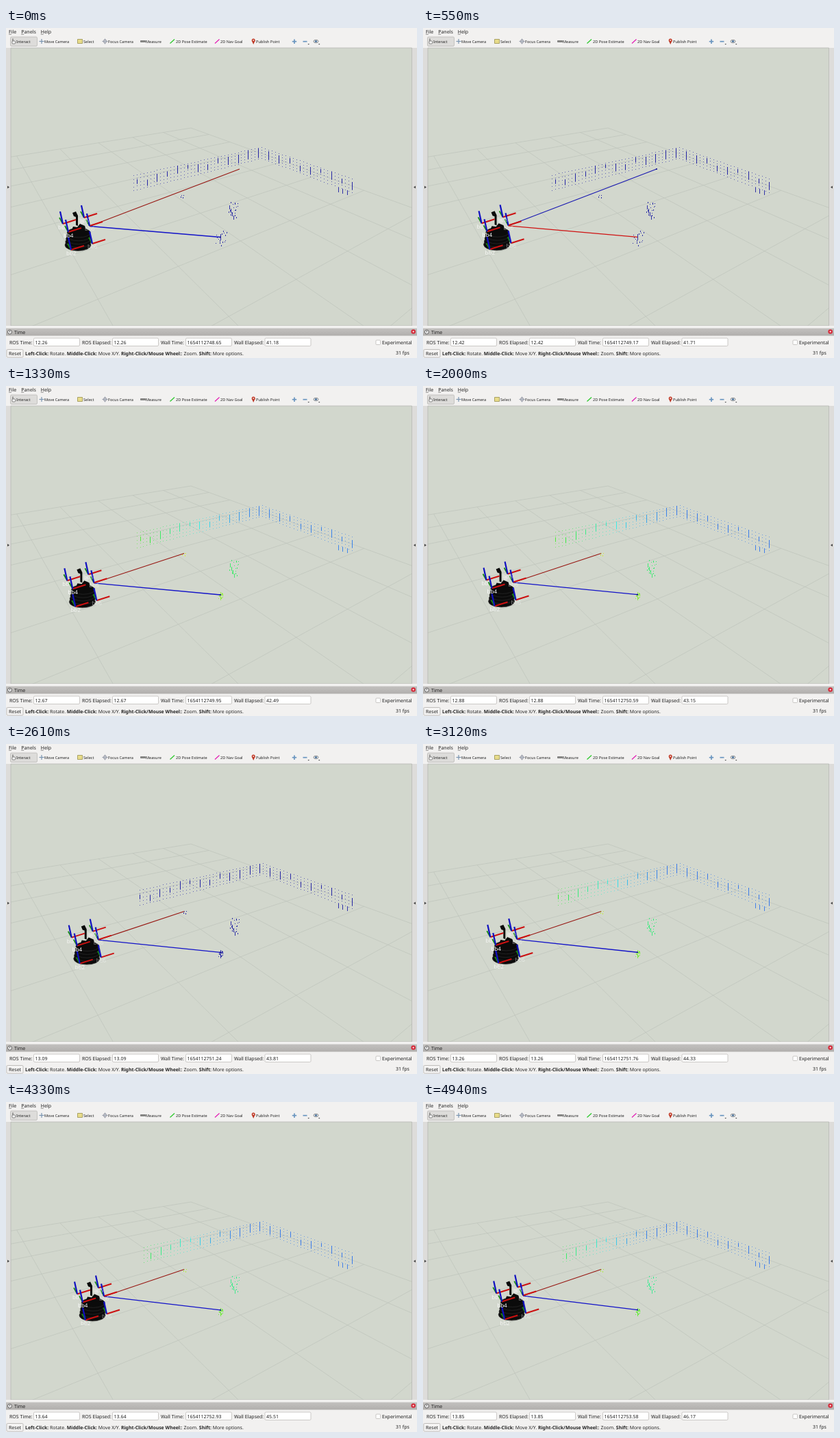
These frames come from a looping animation (600 px wide and 482 px high, 5 s). An HTML page with a canvas:

```html
<!DOCTYPE html>
<html lang="en">
<head>
<meta charset="utf-8">
<title>Laser scan view</title>
<style>
html, body { margin: 0; width: 600px; height: 482px; overflow: hidden; background: #f2f1f0; }
canvas { display: block; }
</style>
</head>
<body>
<canvas id="stage" width="600" height="482"></canvas>
<script>
const ctx = document.getElementById('stage').getContext('2d');
const LOOP = 5000;
const UPDATE = 65;
const FONT = '"Noto Sans", sans-serif';
const INK = '#222';

const lerp = (a, b, p) => a + (b - a) * p;

function random(seed) {
  const v = Math.sin(seed * 127.1 + 11.7) * 43758.5453;
  return v - Math.floor(v);
}

function box(x, y, w, h, fill, stroke, r = 0) {
  ctx.beginPath();
  ctx.roundRect(x, y, w, h, r);
  if (fill) { ctx.fillStyle = fill; ctx.fill(); }
  if (stroke) { ctx.strokeStyle = stroke; ctx.lineWidth = 0.7; ctx.stroke(); }
}

function line(color, width, x1, y1, x2, y2) {
  ctx.beginPath();
  ctx.moveTo(x1, y1);
  ctx.lineTo(x2, y2);
  ctx.strokeStyle = color;
  ctx.lineWidth = width;
  ctx.stroke();
}

function shape(color, ...p) {
  ctx.beginPath();
  for (let i = 0; i < p.length; i += 2) ctx.lineTo(p[i], p[i + 1]);
  ctx.fillStyle = color;
  ctx.fill();
}

function oval(x, y, rx, ry, fill, stroke) {
  ctx.beginPath();
  ctx.ellipse(x, y, rx, ry, 0, 0, Math.PI * 2);
  if (fill) { ctx.fillStyle = fill; ctx.fill(); }
  if (stroke) { ctx.strokeStyle = stroke; ctx.lineWidth = 0.7; ctx.stroke(); }
}

// Returns the x where the text ends.
function text(str, x, y, size = 7, color = INK, weight = 400) {
  ctx.font = `${weight} ${size}px ${FONT}`;
  ctx.textRendering = 'geometricPrecision';
  ctx.fillStyle = color;
  ctx.fillText(str, x, y);
  return x + ctx.measureText(str).width;
}

function drawMenu() {
  let x = 4;
  for (const label of ['File', 'Panels', 'Help']) {
    line(INK, 0.5, x, 9.2, x + 4, 9.2);
    x = text(label, x, 8) + 7;
  }
}

function cross(color, width, x, y, r) {
  line(color, width, x - r, y, x + r, y);
  line(color, width, x, y - r, x, y + r);
}

function drawToolbar() {
  box(0, 11, 600, 18, '#f2f1f0');
  box(6.5, 13, 39, 13.5, '#dddcda', '#b5b3b0', 1.5);
  const labels = { 'Interact': 15, 'Move Camera': 56, 'Select': 113, 'Focus Camera': 149,
    'Measure': 204, '2D Pose Estimate': 248, '2D Nav Goal': 313, 'Publish Point': 365 };
  for (const label in labels) text(label, labels[label], 22, 5.6);

  box(9, 19, 4.5, 4, '#fff', '#555', 1);
  line('#555', 1, 10, 15.5, 10, 19);
  cross('#7a94b0', 1.2, 52, 19.5, 3.5);
  box(104.5, 16.5, 7, 6, '#e8dc8a', '#8b8440');
  cross('#8794a4', 0.8, 144.5, 19.5, 4);
  oval(144.5, 19.5, 2.5, 2.5, null, '#778');
  box(196.5, 18.5, 7, 2, '#8b8b86', '#666');
  line('#2cc92c', 1.3, 239.5, 22.5, 246, 16.5);
  line('#e321b5', 1.3, 305, 22.5, 311.5, 16.5);
  shape('#b93322', 358.8, 18.5, 361.2, 24, 363.6, 18.5);
  oval(361.2, 18, 2.5, 2.5, '#c33b28');
  oval(361.2, 18, 0.9, 0.9, '#eee');
  cross('#6a96c0', 1.7, 421, 19.7, 3.2);
  line('#6a96c0', 1.7, 433.5, 19.7, 439.5, 19.7);
  oval(452.5, 19.5, 3.5, 2.2, '#dfe8ef', '#666');
  oval(452.5, 19.5, 1.3, 1.3, '#234f80');
  for (const x of [440.5, 456]) shape('#444', x, 23, x + 2.5, 23, x + 1.2, 24.5);
}

function drawTimePanel(s) {
  box(0, 435, 600, 47, '#f2f1f0');
  const shade = ctx.createLinearGradient(0, 438, 0, 450);
  shade.addColorStop(0, '#c4c2c0');
  shade.addColorStop(1, '#b0aeac');
  box(0, 438.5, 600, 11, shade);
  oval(5.5, 444, 3, 3, '#eee', '#333');
  line('#333', 0.7, 5.5, 442, 5.5, 444.5);
  text('Time', 12, 446.7);
  oval(594.7, 443.5, 3.3, 3.3, '#d52b3b');
  oval(594.7, 443.5, 1.1, 1.1, '#fff');

  const ros = (12.256 + 0.322 * s).toFixed(2);
  const fields = [
    ['ROS Time:', 5, 40.5, ros],
    ['ROS Elapsed:', 111, 155.5, ros],
    ['Wall Time:', 226, 262.5, '16541127' + (48.65 + 0.997 * s).toFixed(2)],
    ['Wall Elapsed:', 333, 378, (41.18 + 1.01 * s).toFixed(2)]
  ];
  for (const [label, x, boxX, value] of fields) {
    text(label, x, 461.5);
    box(boxX, 453, 67, 11.5, '#fff', '#b8b5b2', 1.5);
    text(value, boxX + 2, 461.5);
  }
  box(540, 456, 6.5, 6.5, '#fff', '#b5b2af', 1);
  text('Experimental', 549, 461.5);

  box(1, 469.5, 24, 11.5, '#f5f4f3', '#aaa7a4', 1.5);
  text('Reset', 4, 478);
  const hints = ['Left-Click:', ' Rotate. ', 'Middle-Click:', ' Move X/Y. ',
    'Right-Click/Mouse Wheel:', ': Zoom. ', 'Shift:', ' More options.'];
  let x = 28;
  hints.forEach((hint, i) => { x = text(hint, x, 477.5, 6.9, INK, i % 2 ? 400 : 700); });
  text('31 fps', 569, 476.5);
}

// Perspective floor: a and b run from the far corner away from two vanishing points.
function floor(a, b) {
  const w = 1 - a - b;
  return [(270 - a * 1054 + b * 79) / w, (146 - (a + b) * 20) / w];
}

function drawGrid() {
  const stepA = 0.049, stepB = 0.07, nearest = 0.93;
  for (let k = 0; k <= 10; k++) {
    const a = k * stepA, b = k * stepB;
    line('#bec3ba', 0.7, ...floor(a, 0), ...floor(a, Math.min(10 * stepB, nearest - a)));
    line('#bec3ba', 0.7, ...floor(0, b), ...floor(Math.min(10 * stepA, nearest - b), b));
  }
}

// Either one dark blue, or a rainbow from green (near) to blue (far).
function scanColor(s) {
  const plain = s < 3 && s % 2 < 1;
  return hue => plain ? '#1414a0' : `hsl(${Math.min(218, hue + 4 * s)},85%,55%)`;
}

const wallHue = x => x < 300
  ? lerp(110, 185, (x - 200) / 100)
  : Math.min(210, lerp(185, 210, (x - 300) / 60));

function dot(x, y, color, h = 1) {
  ctx.fillStyle = color;
  ctx.fillRect(Math.round(x), Math.round(y), 1, h);
}

function drawWall(endX, endY, endHeight, startX, step, color, seed) {
  const rows = 5;
  const top = x => lerp(174, endY, (x - 373) / (endX - 373));
  const height = x => lerp(16, endHeight, (x - 373) / (endX - 373));
  const columns = Math.floor(Math.abs(endX - startX) / step);
  for (let c = 0; c <= columns; c++) {
    const x = lerp(startX, endX, c / columns);
    ctx.globalAlpha = 0.6;
    for (let r = 0; r < rows; r++) dot(x, top(x) + height(x) * r / (rows - 1), color(wallHue(x)));
    // Every third column holds a run of hits.
    if (c % 3 !== 1) continue;
    ctx.globalAlpha = 0.9;
    const run = lerp(4, 14, random(c + seed));
    dot(x, top(x) + (height(x) - run) * random(c + seed + 40), color(wallHue(x)), run);
  }
}

function scatter(count, x, y, w, h, color, seed) {
  for (let i = 0; i < count; i++)
    dot(x + w * (random(i + seed) - 0.5), y + h * (random(i + seed + 50) - 0.5), color, 1 + i % 2);
}

function drawScan(s) {
  const color = scanColor(s);
  const drift = Math.min(2, s);
  drawWall(lerp(186, 204, s / 5), lerp(215, 211, s / 5), 22, 373 + drift, 4.8, color, 3);
  drawWall(505, 220, 20, 378 + drift, 5, color, 9);

  ctx.globalAlpha = 0.85;
  for (const x of [485, 491, 498]) dot(x, x / 3 + 71, color(210), 7);

  scatter(5, 256 + drift * 2, 245, 7, 4, color(62), 6);
  scatter(18, 331 + drift, 265, 14, 24, color(130), 0);
  for (let i = 0; i < 4; i++) dot(326 + drift + i * 2, 259 + i * 5, color(130), 6);

  const spread = s < 1 ? 1 : 0.4;
  scatter(16, 313, 307, 18 * spread, 24 * spread, color(85), 90);
  dot(313, 301, color(85), 9);
  ctx.globalAlpha = 1;
}

function drawBeams(s, dx, dy) {
  const early = s < 1;
  const swapped = early && s > 0.3;
  const start = [122 + dx, 289.5 + dy];
  const far = early ? [341, 206] : [260, 244.5];
  const low = [313, 305.5 - 0.4 * s];
  line(swapped ? '#1616b0' : '#961510', 1.1, ...start, ...far);
  line(swapped ? '#cf1212' : '#1212c8', 1.3, ...start, ...low);
  oval(...(swapped ? far : low), 1.1, 1.1, '#101090');
}

function drawAxes(x, y) {
  line('#168a16', 1.8, x, y, x - 5, y - 9);
  line('#cc1010', 2, x, y, x + 19, y - 6);
  line('#1010c0', 2.2, x, y, x - 4, y - 18);
}

function drawRobot(dx, dy) {
  const black = '#0b0b0b';
  ctx.save();
  ctx.translate(dx, dy);

  // Stacked plates, then the upper deck and the arm.
  for (let i = 0; i < 5; i++)
    oval(105 + i * 0.3, 317 - i * 4.5, 19 - i * 0.5, 8.5 - i * 0.4, black, '#2c2c2c');
  shape(black, 95, 297, 98, 290, 104, 291, 108, 286, 115, 289, 118, 297);
  shape(black, 97, 270, 102, 268, 105, 274, 105, 289, 102, 288, 102, 276, 99, 275);
  oval(111, 283, 3, 3.5, '#dfe0dc');

  // Three rows of sensor frames, two in each.
  const rows = [[83, 286], [91, 298], [95, 324]];
  for (const [x, y] of rows)
    for (const side of [0, 1]) drawAxes(x + side * 31, y - side * 9);
  rows.forEach(([x, y], i) => {
    text(['bb', 'bb4', 'bb2'][i], x - 7, y + 8, 8, i === 1 ? '#fff' : '#ffffffcc');
    text('bb6', x + 24, y - 2, 8, '#ffffff80');
  });
  ctx.restore();
}

function drawView(s) {
  box(0, 29, 600, 406, '#dddcda');
  shape('#444', 2, 230.5, 5, 232.5, 2, 234.5);
  shape('#444', 598, 230.5, 595, 232.5, 598, 234.5);
  ctx.save();
  ctx.beginPath();
  ctx.rect(7, 29, 585.5, 406);
  ctx.clip();
  box(7, 29, 586, 406, '#d2d7cd');
  drawGrid();
  drawScan(s);
  const dx = 4.9 * s, dy = -1.3 * s;
  drawBeams(s, dx, dy);
  drawRobot(dx, dy);
  ctx.restore();
  box(7, 29, 585.5, 406, null, '#b4b3b0');
}

function tick() {
  const now = performance.now() % LOOP;
  const s = Math.floor(now / UPDATE) * UPDATE / 1000;
  box(0, 0, 600, 482, '#f2f1f0');
  drawMenu();
  drawToolbar();
  drawView(s);
  drawTimePanel(s);
  requestAnimationFrame(tick);
}
tick();
</script>
</body>
</html>
```
